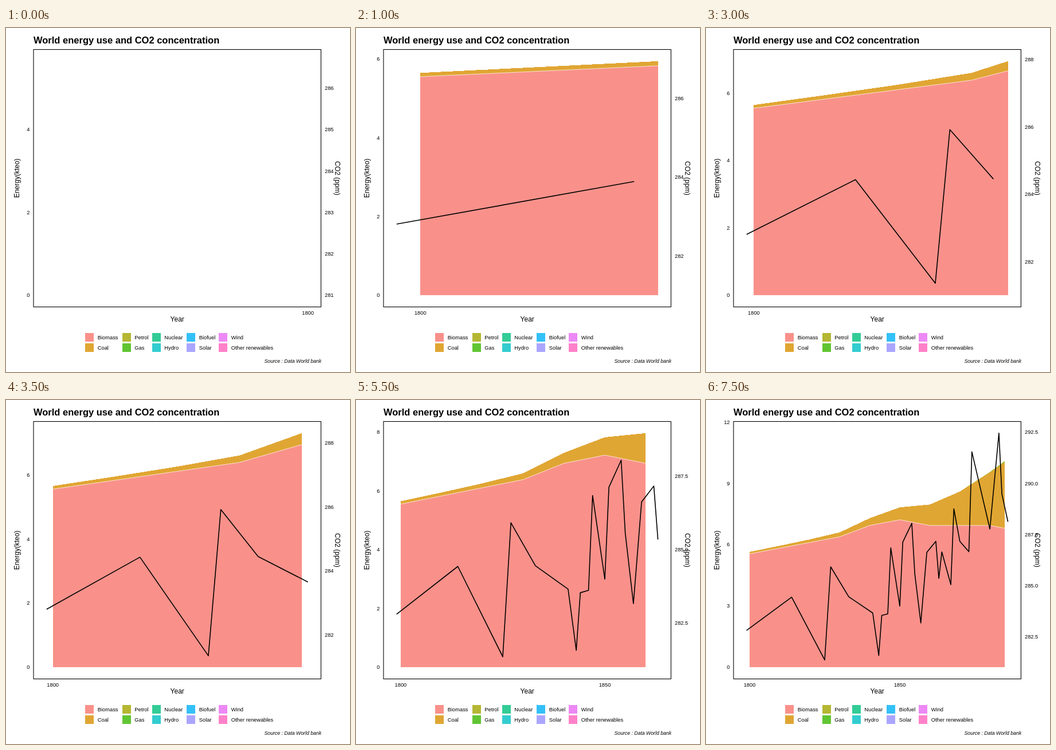
These frames come from a looping animation (600 by 600 pixels, 8 s). An HTML page:

```html
<!DOCTYPE html>
<html lang="en">
<head>
<meta charset="utf-8">
<title>World energy use and CO2 concentration</title>
<style>
html, body { margin: 0; width: 100%; height: 100%; overflow: hidden; background: #fff; }
svg { display: block; font: 9.3px "Liberation Sans", Arial, sans-serif; }
polygon, .key, .seam { shape-rendering: crispEdges; }
polyline { fill: none; stroke: #000; stroke-width: 1.6; stroke-linejoin: round; }
polyline.seam { stroke: #fff; stroke-width: .7; }
.panel { fill: none; stroke: #000; stroke-width: 1.1; }
.title { font-size: 16.5px; font-weight: bold; }
.name { font-size: 12px; text-anchor: middle; }
.caption { font-size: 8.7px; font-style: italic; }
.middle { text-anchor: middle; }
.end { text-anchor: end; }
</style>
</head>
<body>
<svg width="600" height="600" viewBox="0 0 600 600">
  <g id="plot"></g>
  <rect class="panel" x="48" y="37.5" width="501.4" height="449"/>
  <g id="axes"></g>
  <text class="title" x="48" y="27">World energy use and CO2 concentration</text>
  <text class="name" x="298.7" y="512">Year</text>
  <text class="name" transform="translate(23 262) rotate(-90)">Energy(kteo)</text>
  <text class="name" transform="translate(574 262) rotate(90)">CO2 (ppm)</text>
  <g id="legend"></g>
  <text class="caption end" x="550" y="584">Source : Data World bank</text>
</svg>
<script>
const STEP_MS = 500, STEPS = 16;
const FIRST_YEAR = 1799, YEARS_PER_STEP = 220 / 39;
const LEFT = 70.8, RIGHT = 526.6, BOTTOM = 466.3, TOP = 57.9;

const sources = [
  ['Biomass', '#f9918a'], ['Coal', '#e0a633'], ['Petrol', '#b5b733'], ['Gas', '#61c533'],
  ['Nuclear', '#33cc97'], ['Hydro', '#33ccd0'], ['Biofuel', '#33c0f8'], ['Solar', '#aaa6ff'],
  ['Wind', '#ec89f5'], ['Other renewables', '#ff81c9']
];
const legendX = [138, 202.5, 254.5, 315, 371];

// One row per decade: year, biomass, coal, petrol, gas.
const energy = [20, 21, 22, 23, 25, 26, 25, 25, 25, 24].map((biomass, d) => [
  1800 + 10 * d,
  biomass * 5 / 18,
  .097 + .018 * d + 3.597 * (d / 9) ** 3.65,
  .033 * Math.max(0, d - 7) ** 1.4,
  .033 * Math.max(0, d - 8)
]);

// Turning points of the curve: year, ppm above 281.
const co2 = [
  [1799, 1.81], [1814, 3.435], [1825, .36], [1827, 4.92], [1833, 3.455], [1841, 2.66],
  [1843, .58], [1844, 2.54], [1846, 2.62], [1847, 5.85], [1850, 3], [1851, 6.13],
  [1854, 7.05], [1855, 4.57], [1857, 2.17], [1859, 5.63], [1862, 6.17], [1863, 4.35],
  [1864, 5.65], [1867, 4.05], [1868, 7.76], [1870, 6.165], [1873, 5.66], [1874, 10.55],
  [1880, 6.77], [1883, 11.46], [1884, 8.48], [1886, 7.13]
];

const el = id => document.getElementById(id);
const stepOf = row => Math.round((row[0] - FIRST_YEAR) / YEARS_PER_STEP);
const sum = list => list.reduce((a, b) => a + b, 0);
const label = (str, x, y, cls = '') => `<text class="${cls}" x="${x}" y="${y}">${str}</text>`;

// Rows reached by the given step, plus one interpolated towards the next row.
function reveal(rows, step) {
  const shown = rows.filter(r => stepOf(r) <= step);
  const last = shown[shown.length - 1], next = rows[shown.length];
  const from = stepOf(last);
  if (next && from < step) {
    const k = (step - from) / (stepOf(next) - from);
    shown.push(last.map((v, i) => v + (next[i] - v) * k));
  }
  return shown;
}

function axis(start, gap, offset, x, cls, py) {
  let out = '';
  for (let v = start; v < start + 15; v += gap) {
    const y = py(v - offset);
    if (y > 37.5 && y < 486.5) out += label(v.toFixed(gap % 1 ? 1 : 0), x, y + 3, cls);
  }
  return out;
}

function draw(step) {
  const area = reveal(energy, step), line = reveal(co2, step), rows = [...area, ...line];
  const span = Math.max(...rows.map(r => r[0])) - FIRST_YEAR;
  const peak = Math.max(...rows.map(r => sum(r.slice(1))));
  const px = year => LEFT + (year - FIRST_YEAR) / span * (RIGHT - LEFT);
  const py = v => BOTTOM - v / peak * (BOTTOM - TOP);
  const edge = n => area.map(r => [px(r[0]), py(sum(r.slice(1, n + 1)))]);

  const layers = sources.slice(0, 4).map(([, color], i) =>
    `<polygon fill="${color}" points="${[...edge(i), ...edge(i + 1).reverse()]}"/>`);
  el('plot').innerHTML = step ? layers.join('') +
    `<polyline class="seam" points="${edge(1)}"/>` +
    `<polyline points="${line.map(([year, v]) => [px(year), py(v)])}"/>` : '';

  el('axes').innerHTML =
    axis(0, step < 13 ? 2 : step < 15 ? 2.5 : 3, 0, 41.5, 'end', py) +
    axis(280, step < 2 ? 1 : step < 9 ? 2 : 2.5, 281, 556, '', py) +
    [1800, 1850].filter(year => px(year) < 549)
      .map(year => label(year, px(year), 500, 'middle')).join('');
}

el('legend').innerHTML = sources.map(([name, color], i) => {
  const x = legendX[i >> 1], row = i % 2;
  return `<rect class="key" x="${x}" y="${532.4 + row * 17.3}" width="15" height="14.8" fill="${color}"/>` +
    label(name, x + 21.8, 543 + row * 17.8);
}).join('');

let current = -1;
function tick() {
  const step = Math.floor(performance.now() / STEP_MS) % STEPS;
  if (step !== current) draw(current = step);
  requestAnimationFrame(tick);
}
tick();
</script>
</body>
</html>
```
